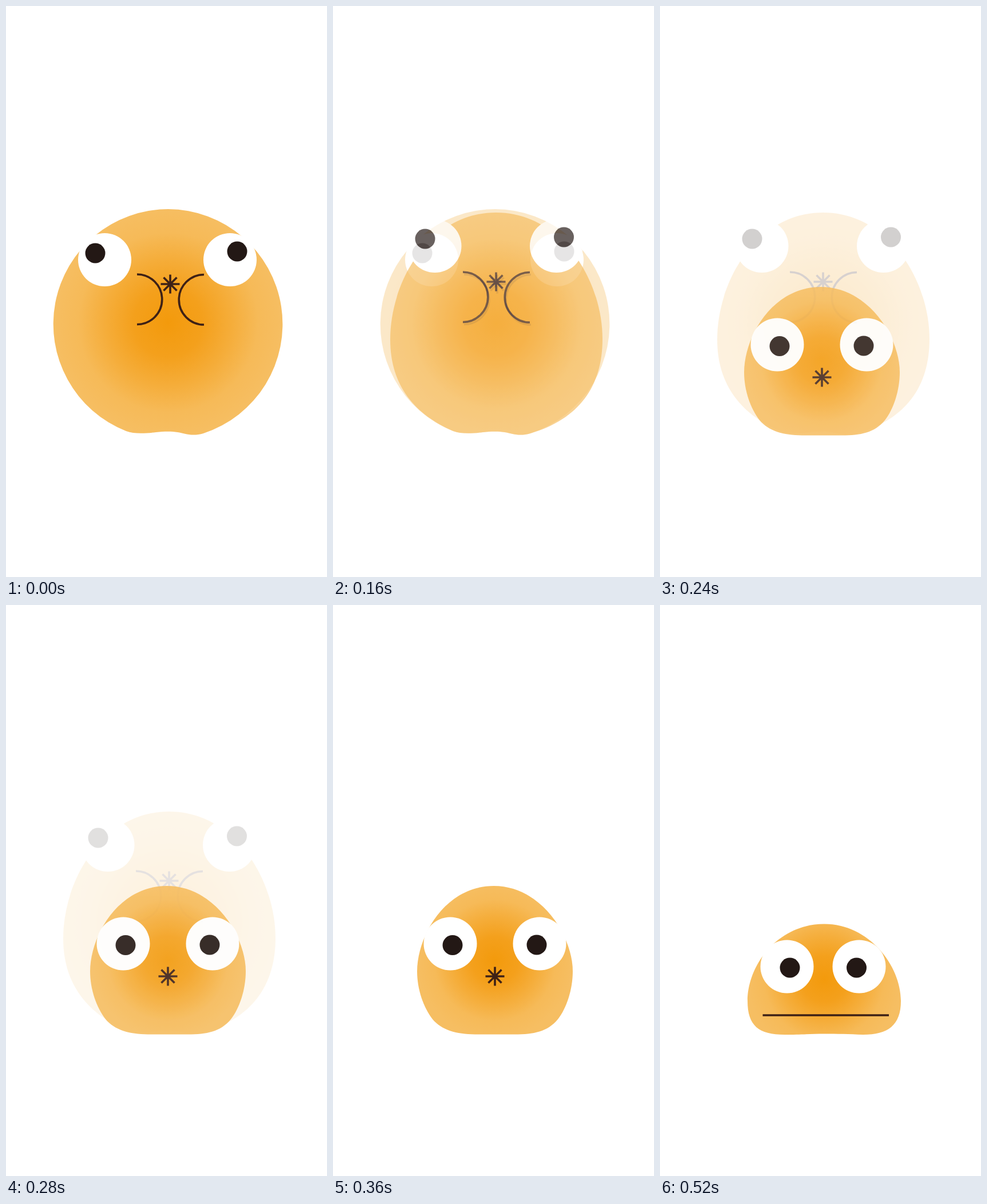
Animation of 561x998 px, one loop 0.56 s. Source, as an HTML page:

```html
<!DOCTYPE html>
<html lang="en">
<head>
<meta charset="utf-8">
<title>Bouncing blob</title>
<style>
  html, body { margin: 0; width: 100%; height: 100%; overflow: hidden; background: #fff; }
  svg { display: block; width: 100%; height: 100%; }
</style>
</head>
<body>
<svg id="stage" viewBox="0 0 561 998"></svg>
<script>
const LOOP = 560;
const stage = document.getElementById('stage');

const star = (x, y, r, d) =>
  `M${x - r} ${y}h${2 * r}M${x} ${y - r}v${2 * r}` +
  `M${x - d} ${y - d}l${2 * d} ${2 * d}M${x - d} ${y + d}l${2 * d} ${-2 * d}`;

const cheeks = (x, y) =>
  `M${x} ${y}a43.5 43.5 0 0 1 0 87.5M${x + 117} ${y + 0.5}a43.5 43.5 0 0 0 0 87.5`;

// Wavy underside shared by the two inflated poses, drawn right to left
const under = 'C325 753 312 747 300 745S276 743.5 262 745S225 749 210 743';

// eyes and pupils: [left x, left y, right x, right y]
const poses = [
  {
    body: `M283.5 355A201 201 0 0 1 345 747${under}A201 201 0 0 1 283.5 355Z`,
    mid: [283.5, 553], r: 201,
    eyes: [172.5, 443.5, 391.5, 443.5], pupils: [156, 432, 404, 429],
    lines: cheeks(229, 469) + star(287, 486, 16.5, 11.5)
  },
  {
    body: `M285 361C400 361 471 480 471 582C471 665 430 722 345 747${under}` +
      'C145 715 100 665 100 583C100 480 170 361 285 361Z',
    mid: [285.5, 555], r: 190,
    eyes: [178, 419.5, 390.5, 419.5], pupils: [161, 407, 403.5, 404],
    lines: cheeks(227, 465) + star(285, 482, 16.5, 11.5)
  },
  {
    body: 'M281 491C365 491 419 580 419 640C419 672 408 705 393 724' +
      'C375 746 350 750.5 318 750.5L248 750.5C215 750 190 743 174 724' +
      'C158 703 147 672 147 640C147 580 195 491 281 491Z',
    mid: [283, 621], r: 136,
    eyes: [205, 592, 361, 592], pupils: [209, 594.5, 356, 594],
    lines: star(283, 649, 16.5, 11.5)
  },
  {
    body: 'M295 519.5C375 519.5 428 610 428 682C428 728 405 750.5 365 750.5' +
      'C340 750 320 748.5 295 748.5C265 748.5 250 750 215 750' +
      'C180 750 162 728 162 684C162 610 210 519.5 295 519.5Z',
    mid: [295, 635], r: 133,
    eyes: [230, 609, 359, 609], pupils: [235, 611, 354.5, 611],
    lines: 'M259 685H330'
  },
  {
    body: 'M287 557.5C365 557.5 421 630 421 692C421 735 398 751 355 751' +
      'C330 750 310 749.5 287 749.5C262 749.5 245 751 218 751' +
      'C172 751 153 735 153 692C153 630 205 557.5 287 557.5Z',
    mid: [287, 654], r: 134,
    eyes: [222, 632, 348, 632], pupils: [227, 634, 343.5, 634],
    lines: 'M179.5 717H400'
  }
];

const pair = ([x1, y1, x2, y2], r, fill) =>
  `<g fill="${fill}"><circle cx="${x1}" cy="${y1}" r="${r}"/>` +
  `<circle cx="${x2}" cy="${y2}" r="${r}"/></g>`;

const drawPose = (p, i) => `
  <radialGradient id="glow${i}" gradientUnits="userSpaceOnUse"
      cx="${p.mid[0]}" cy="${p.mid[1]}" r="${p.r}">
    <stop offset="0" stop-color="#f39a0c"/>
    <stop offset=".3" stop-color="#f4a01c"/>
    <stop offset=".55" stop-color="#f5ad3a"/>
    <stop offset=".78" stop-color="#f6ba58"/>
    <stop offset="1" stop-color="#f6be62"/>
  </radialGradient>
  <g class="pose">
    <path d="${p.body}" fill="url(#glow${i})"/>
    ${pair(p.eyes, 46.5, '#fff')}
    ${pair(p.pupils, 17.5, '#231815')}
    <path d="${p.lines}" fill="none" stroke="#3e2116" stroke-width="3.6"/>
  </g>`;

stage.innerHTML = poses.map(drawPose).join('');
const layers = [...stage.querySelectorAll('.pose')];

// [start ms, lower pose, its opacity, opacity of the next pose above it]
const steps = [
  [0, 0, 1, 0],
  [80, 0, 0.68, 0.36],
  [160, 0, 0.34, 0.68],
  [200, 1, 1, 0],
  [240, 1, 0.2, 0.85],
  [280, 1, 0.13, 0.9],
  [320, 1, 0.07, 0.95],
  [360, 2, 1, 0],
  [400, 3, 1, 0],
  [440, 3, 0.68, 0.35],
  [480, 3, 0.34, 0.68],
  [520, 4, 1, 0]
];

function render(ms) {
  const t = ms % LOOP;
  const [, low, lowAlpha, topAlpha] = steps.filter(s => s[0] <= t).pop();
  layers.forEach((g, i) => {
    const alpha = i === low ? lowAlpha : i === low + 1 ? topAlpha : 0;
    g.setAttribute('opacity', alpha);
  });
}

function tick() {
  render(performance.now());
  requestAnimationFrame(tick);
}
tick();
</script>
</body>
</html>
```
